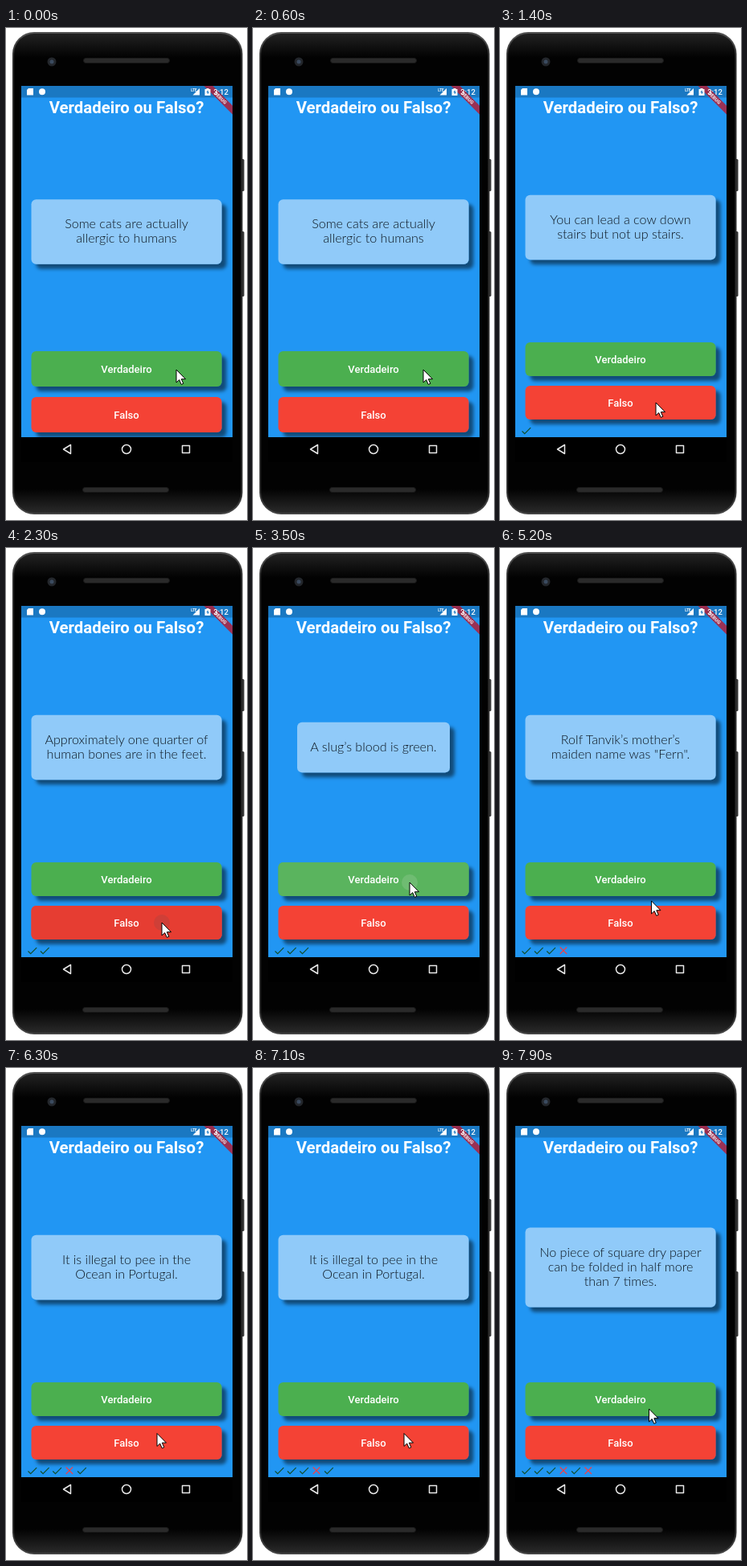
These frames come from a looping animation (300 by 612 pixels, 8000 ms). An HTML page:

```html
<!DOCTYPE html>
<html lang="pt">
<head>
<meta charset="utf-8">
<title>Verdadeiro ou Falso?</title>
<style>
  html, body { margin: 0; width: 100%; height: 100%; overflow: hidden; background: #fff; }
  svg { display: block; width: 100vw; height: 100vh; }
  text { font-family: Roboto, sans-serif; fill: #fff; text-anchor: middle; }
  #question text { font: 300 16.1px Lato, sans-serif; fill: #0c1620; }
  .label { font-size: 13px; font-weight: 500; }
</style>
</head>
<body>
<svg viewBox="0 0 300 612">
  <defs>
    <filter id="shadow" x="-10%" y="-20%" width="125%" height="160%">
      <feDropShadow dx="6" dy="6" stdDeviation="2.2" flood-color="#000" flood-opacity=".5"/>
    </filter>
    <linearGradient id="rim" x2="0" y2="1">
      <stop offset="0" stop-color="#555"/>
      <stop offset=".06" stop-color="#2b2b2b"/>
      <stop offset=".94" stop-color="#2b2b2b"/>
      <stop offset="1" stop-color="#444"/>
    </linearGradient>
    <linearGradient id="body" x2="0" y2="1">
      <stop offset="0" stop-color="#222"/>
      <stop offset=".05" stop-color="#020202"/>
      <stop offset=".95" stop-color="#020202"/>
      <stop offset="1" stop-color="#2a2a2a"/>
    </linearGradient>
    <clipPath id="screen"><rect x="19" y="72" width="263" height="437"/></clipPath>
    <clipPath id="tapArea"><rect id="tapRect" x="31.5" width="237" rx="6"/></clipPath>
  </defs>

  <!-- phone -->
  <g fill="#333">
    <rect x="291" y="163" width="5.500" height="40" rx="1.5"/>
    <rect x="291" y="253" width="5.500" height="81" rx="1.5"/>
  </g>
  <rect x="8" y="5" width="286.500" height="600" rx="27" fill="url(#rim)"/>
  <rect x="10" y="7" width="282.500" height="596" rx="25" fill="url(#body)"/>
  <rect x="19" y="72" width="263" height="468" fill="#000"/>
  <g fill="#2a2a2a" stroke="#191919">
    <rect x="96.500" y="37.500" width="107" height="6" rx="3"/>
    <rect x="95.500" y="571.500" width="107" height="6" rx="3"/>
  </g>
  <circle cx="57" cy="42" r="5.500" fill="#23262b"/>
  <circle cx="57" cy="42" r="2.500" fill="#3b4b60"/>

  <!-- app -->
  <g clip-path="url(#screen)">
    <rect x="19" y="72" width="263" height="437" fill="#2196f3"/>
    <rect x="19" y="72" width="263" height="14.500" fill="#1a78c2"/>
    <text x="150" y="106" font-size="20.400" font-weight="700">Verdadeiro ou Falso?</text>
    <g transform="translate(282 72) rotate(45)">
      <rect x="-27" y="17.300" width="54" height="7.800" fill="#b0203a" fill-opacity=".85"/>
      <text y="23.300" font-size="6" font-weight="900" fill-opacity=".85">DEBUG</text>
    </g>
    <g fill="#fff">
      <path d="M28 75h6v8.500h-8v-6.500z"/>
      <circle cx="45" cy="79.300" r="4"/>
      <path d="M241 75v8.500h-8.500z"/>
      <path d="M247.500 76h2v-1h3v1h2v8h-7z"/>
      <path d="M251.500 77l-2.200 3.200h1.500v2.600l2.200-3.400h-1.500z" fill="#1a78c2"/>
      <text x="234" y="79" font-size="4.500" font-weight="700">LTE</text>
      <text x="267.500" y="83" font-size="9.500" font-weight="500">3:12</text>
    </g>

    <g filter="url(#shadow)"><rect id="card" rx="6" fill="#90caf9"/></g>
    <g id="question"></g>
    <g filter="url(#shadow)">
      <rect id="yes" x="31.500" width="237" rx="6" fill="#4caf50"/>
      <rect id="no" x="31.500" width="237" rx="6" fill="#f44336"/>
    </g>
    <g id="tap" clip-path="url(#tapArea)">
      <rect id="glow" x="31" y="385" width="238" height="124"/>
      <circle id="splash"/>
    </g>
    <text id="yesLabel" class="label" x="150">Verdadeiro</text>
    <text id="noLabel" class="label" x="150">Falso</text>
    <g id="marks" fill="none" stroke-width="1.200"></g>
  </g>

  <!-- navigation bar -->
  <g fill="none" stroke="#e8e8e8" stroke-width="1.500" stroke-linejoin="round">
    <path d="M80.500 518.500v11l-9-5.500z"/>
    <circle cx="150" cy="524" r="5.500"/>
    <rect x="219.500" y="519.500" width="9" height="9"/>
  </g>

  <path id="cursor" d="M0 0V16L3.700 12.600 6.200 18.400 8.800 17.300 6.300 11.700H11.500Z" fill="#fff" stroke="#000"/>
</svg>
<script>
const LOOP = 8000;
const $ = id => document.getElementById(id);
const set = (id, attrs) => {
  for (const name in attrs) $(id).setAttribute(name, attrs[name]);
};

const questions = [
  ["Some cats are actually", "allergic to humans"],
  ["You can lead a cow down", "stairs but not up stairs."],
  ["Approximately one quarter of", "human bones are in the feet."],
  ["A slug’s blood is green."],
  ["Rolf Tanvik’s mother’s", "maiden name was \"Fern\"."],
  ["It is illegal to pee in the", "Ocean in Portugal."],
  ["No piece of square dry paper", "can be folded in half more", "than 7 times."]
];

// Each answer brings up the next question.
const answers = [
  { at: 900, yes: true, right: true },
  { at: 2300, yes: false, right: true },
  { at: 3500, yes: true, right: true },
  { at: 4600, yes: false, right: false },
  { at: 5700, yes: true, right: true },
  { at: 7300, yes: false, right: false }
];

// time, x, y
const pointer = [
  [0, 212, 425], [900, 212, 425], [1300, 194, 466], [2500, 194, 466],
  [2900, 195, 416], [3700, 195, 416], [4100, 190, 464], [4800, 190, 464],
  [5200, 188.5, 439], [5500, 187, 422], [5900, 187, 422], [6250, 188, 454.5],
  [7400, 188, 454.5], [7800, 185.5, 424], [LOOP, 185.5, 424]
];

const tapColors = {
  true: { glow: "#5ab45e", splash: "#6fbc72" },
  false: { glow: "#e63d32", splash: "#cf3f37" }
};

const clamp = v => Math.max(0, Math.min(1, v));
const ease = v => v * v * (3 - 2 * v);

function pointerAt(t) {
  const i = pointer.findIndex(p => p[0] > t);
  const [t0, x0, y0] = pointer[i - 1], [t1, x1, y1] = pointer[i];
  const k = ease((t - t0) / (t1 - t0));
  return [x0 + (x1 - x0) * k, y0 + (y1 - y0) * k];
}

function layoutFor(count) {
  return count
    ? { middle: 248, yes: 391, no: 445, height: 42 }
    : { middle: 253.5, yes: 402, no: 459, height: 44 };
}

function drawPage(count) {
  const { middle, yes, no, height } = layoutFor(count);
  const lines = questions[count];
  const cardHeight = 44 + 18.3 * lines.length;
  const cardWidth = lines.length > 1 ? 237 : 190;
  set("card", { x: 150 - cardWidth / 2, y: middle - cardHeight / 2, width: cardWidth, height: cardHeight });
  $("question").innerHTML = lines.map((line, i) =>
    `<text x="150" y="${middle + 4.5 + 18 * (i - (lines.length - 1) / 2)}">${line}</text>`).join("");
  set("yes", { y: yes, height });
  set("no", { y: no, height });
  set("yesLabel", { y: yes + height / 2 + 4.7 });
  set("noLabel", { y: no + height / 2 + 4.7 });
  $("marks").innerHTML = answers.slice(0, count).map(({ right }, i) => {
    const x = 27.5 + 15.4 * i;
    return right
      ? `<path stroke="#124f2c" d="M${x} 501.500l3.200 3.200 7.500-7.500"/>`
      : `<path stroke="#f0414a" d="M${x + 1} 496.500l8.500 8.500m0-8.500l-8.500 8.500"/>`;
  }).join("");
}

function drawTap(t, count) {
  const tap = answers.find(a => t >= a.at - 100 && t < a.at + 500);
  $("tap").style.display = tap ? "" : "none";
  if (!tap) return;
  const layout = layoutFor(count);
  const since = t - tap.at;
  const [x, y] = pointerAt(tap.at);
  const colors = tapColors[tap.yes];
  set("tapRect", { y: tap.yes ? layout.yes : layout.no, height: layout.height });
  set("glow", { fill: colors.glow, opacity: clamp(1 - (since - 50) / 250) });
  set("splash", {
    cx: x, cy: y, fill: colors.splash,
    r: since < 0 ? 6 + 4 * (1 + since / 100) : 10 + 210 * ease(clamp(since / 450)),
    opacity: clamp(1 - (since - 50) / 400)
  });
}

let shown = -1;
function render(t) {
  const count = answers.filter(a => t >= a.at).length;
  if (count !== shown) drawPage(shown = count);
  drawTap(t, count);
  set("cursor", { transform: `translate(${pointerAt(t)})` });
}

const start = performance.now();
function frame() {
  render((performance.now() - start) % LOOP);
  requestAnimationFrame(frame);
}
frame();
</script>
</body>
</html>
```
